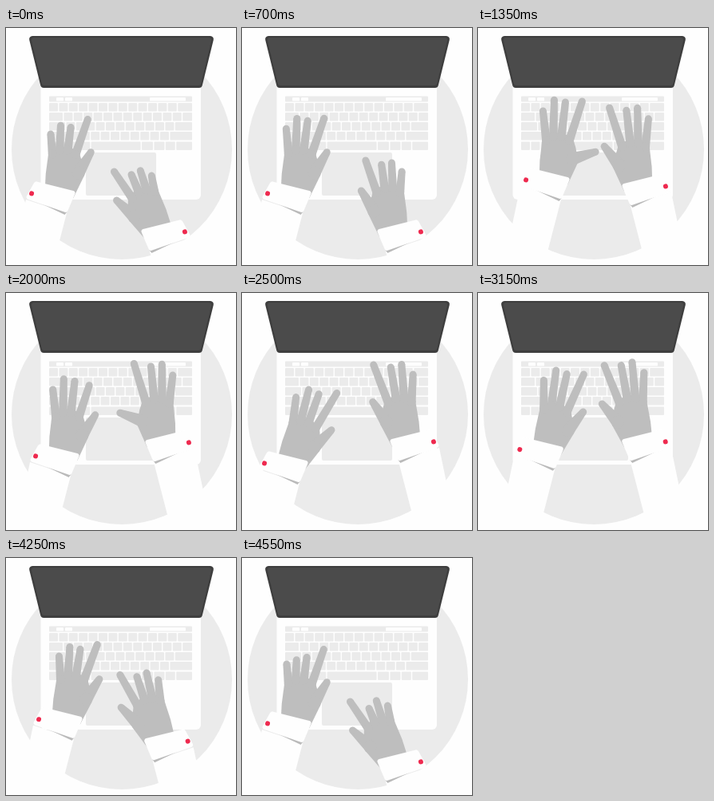
Write an HTML page with a canvas that moves like this. It is 288 px wide and 297 px high and loops after 4.6 s.

```html
<!DOCTYPE html>
<html>
<head>
<meta charset="utf-8">
<style>
  html, body { margin: 0; width: 100%; height: 100%; overflow: hidden; background: #fefefe; }
  canvas { display: block; width: 288px; height: 297px; }
</style>
</head>
<body>
<canvas id="stage" width="288" height="297"></canvas>
<script>
const ctx = document.getElementById('stage').getContext('2d');
const LOOP = 4600, GREY = '#ebebeb', SKIN = '#bebebe', WHITE = '#fefefe';

function fill(color, build) {
  ctx.fillStyle = color;
  ctx.beginPath();
  build();
  ctx.fill();
}
const poly = (color, pts) => fill(color, () => { pts.forEach(p => ctx.lineTo(...p)); ctx.closePath(); });
const box = (color, x, y, w, h, r) => fill(color, () => ctx.roundRect(x, y, w, h, r));
const disc = (color, x, y, r) => fill(color, () => ctx.arc(x, y, r, 0, 7));

function roundedPoly(color, pts, r) {
  fill(color, () => {
    const n = pts.length, last = pts[n - 1];
    ctx.moveTo((last[0] + pts[0][0]) / 2, (last[1] + pts[0][1]) / 2);
    pts.forEach((p, i) => ctx.arcTo(...p, ...pts[(i + 1) % n], r));
    ctx.closePath();
  });
}

// Poses: cuff x, cuff y, hand turn, finger reach, index reach, thumb turn
const left = {
  point: [57, 211, 1, .67, .9, -43],
  swipe: [57, 211, 1, .86, .93, -43],
  wide: [85, 194, 0, 1, 1, 0],
  step: [62, 208, 0, .92, .8, -40],
  apart: [53, 217, 13, .88, 1, -41],
  type: [81, 197, 5, 1, 1, -40]
};
const right = {
  point: [199, 259, 16, .55, .78, -42],
  swipe: [199, 259, 1, .7, .83, -42],
  wide: [210, 202, 0, .95, 1, -35],
  step: [204, 191, -1, .95, 1, -2],
  apart: [215, 190, 3, .93, 1, -42],
  type: [209, 190, 4, 1, 1, -35]
};
const leftTimes = [[0, 'point'], [550, 'point'], [700, 'swipe']];
const rightTimes = [[0, 'point'], [600, 'swipe'], [700, 'swipe']];
const sharedTimes = [
  [760, 'swipe'], [1170, 'wide'], [1350, 'wide'], [1450, 'wide'], [1900, 'step'], [2000, 'step'],
  [2280, 'apart'], [2500, 'apart'], [2650, 'apart'], [3300, 'type'], [3900, 'type'], [4500, 'point'], [4600, 'point']
];

function poseAt(poses, times, t) {
  const i = times.findIndex(k => k[0] > t);
  const [t0, from] = times[i - 1], [t1, to] = times[i];
  const u = (t - t0) / (t1 - t0), e = u * u * (3 - 2 * u);
  return {
    values: poses[from].map((v, n) => v + (poses[to][n] - v) * e),
    tapping: from === to ? Math.sin(Math.PI * u) : 0
  };
}

// Knuckle x, y, direction x, y
const fingers = [[-9, -45, -4, -37], [0, -50, 1, -46], [10, -50, 5, -43], [20, -45, 16, -49]];

function finger(x, y, dx, dy, base, tip) {
  const len = Math.hypot(dx, dy), nx = -dy / len, ny = dx / len;
  const ex = x + dx, ey = y + dy;
  poly(SKIN, [
    [x + nx * base, y + ny * base], [ex + nx * tip, ey + ny * tip],
    [ex - nx * tip, ey - ny * tip], [x - nx * base, y - ny * base]
  ]);
  disc(SKIN, x, y, base);
  disc(SKIN, ex, ey, tip);
}

const rad = deg => deg * Math.PI / 180;

function drawArm(side, { values, tapping }, t) {
  const [x, y, turn, reach, indexReach, thumb] = values;
  ctx.save();
  ctx.translate(x, y);
  ctx.scale(side, 1);
  poly(WHITE, [[-32, 4], [19, 21], [-4, 110], [-54, 110]]);

  ctx.save();
  ctx.translate(9.4, -8);
  ctx.rotate(rad(turn));
  poly(SKIN, [[-18, 10], [-17, -20], [-14, -46], [0, -54], [12, -55], [25, -46], [28, -36], [31, -18], [18, 10]]);
  fingers.forEach(([fx, fy, dx, dy], i) => {
    const tap = tapping * .12 * Math.max(0, Math.sin(t / LOOP * 40 * Math.PI + i * 1.9 + side));
    const k = (i === 3 ? indexReach : reach) - tap;
    finger(fx, fy, dx * k, dy * k, 5.4, 4.5);
  });
  const a = rad(73 + thumb);
  finger(24, -22, 30 * Math.sin(a), -30 * Math.cos(a), 8, 4.5);
  ctx.restore();

  ctx.rotate(rad(15));
  poly('#bababa', [[-10, 12], [24, 13], [22, 18]]);
  roundedPoly(WHITE, [[-25, -13], [28, -14], [24, 15], [-31, 11]], 3);
  disc('#ee2a4f', -25, 3, 3);
  ctx.restore();
}

function drawKeys() {
  const start = 54, end = 233, gap = 1.4;
  const row = (y, widths) => {
    let x = start;
    [...widths, 0].forEach(w => {
      const width = w || end - x;
      box(GREY, x, y, width, 10.6, 1);
      x += width + gap;
    });
  };
  const keys = n => Array(n).fill(11);
  row(94, keys(13));
  row(106, [17, ...keys(12)]);
  row(118, [20, ...keys(11)]);
  row(130, [26, ...keys(10)]);
  row(142.5, [11, 11, 11, 14, 62, 14, 13, 12]);
}

function drawLaptop() {
  disc(GREY, 145, 152, 138);
  box(WHITE, 43.5, 66, 200.5, 149, 6);
  box(GREY, 54, 85.5, 179, 7, 1);
  box(WHITE, 63, 87, 9, 4.5, 1);
  box(WHITE, 74, 87, 9, 4.5, 1);
  box(WHITE, 180, 87, 45, 4.5, 1);
  drawKeys();
  box(GREY, 100, 156, 88, 54, 2);
  roundedPoly('#3e3e3e', [[28, 10], [261, 10], [245, 75], [44, 75]], 4);
  roundedPoly('#4b4b4b', [[31, 12], [258, 12], [243.5, 72], [45.5, 72]], 3);
}

function frame(now) {
  const t = now % LOOP;
  ctx.fillStyle = WHITE;
  ctx.fillRect(0, 0, 288, 297);
  drawLaptop();
  drawArm(1, poseAt(left, [...leftTimes, ...sharedTimes], t), t);
  drawArm(-1, poseAt(right, [...rightTimes, ...sharedTimes], t), t);
  requestAnimationFrame(() => frame(performance.now() - began));
}
const began = performance.now();
frame(0);
</script>
</body>
</html>
```
